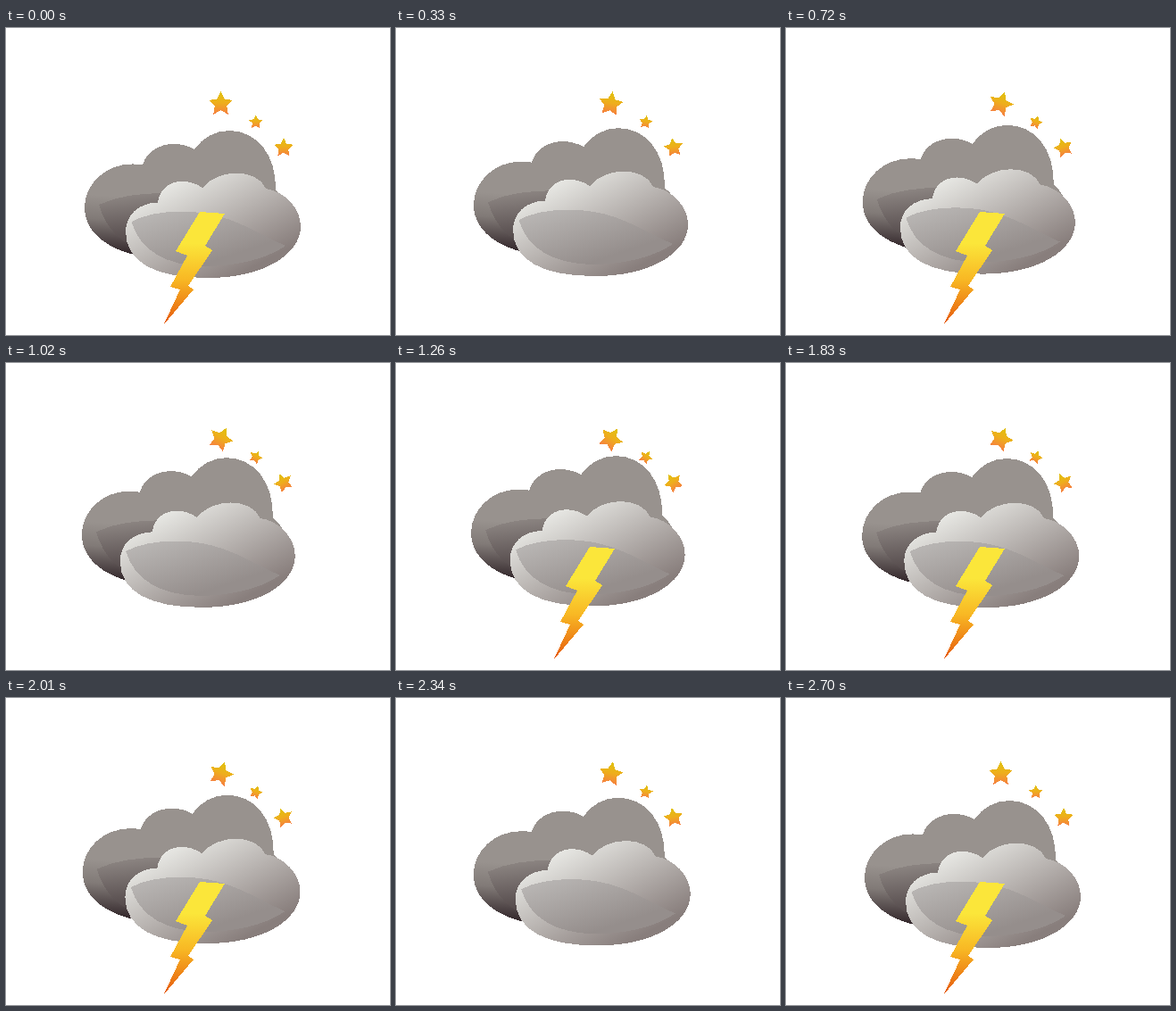
Write an HTML page that moves like this. It is 430 px wide and 344 px high and loops after 2.73 s.

```html
<!DOCTYPE html>
<html lang="en">
<head>
<meta charset="utf-8">
<title>Stormy night</title>
<style>
  html, body { margin: 0; width: 100%; height: 100%; overflow: hidden; background: #fff; }
  svg { display: block; width: 100vw; height: 100vh; }
</style>
</head>
<body>
<svg viewBox="0 0 430 344" shape-rendering="crispEdges">
  <defs>
    <linearGradient id="backFill" gradientUnits="userSpaceOnUse" x1="148" y1="190" x2="144" y2="256">
      <stop offset="0" stop-color="#98928e"/>
      <stop offset=".4" stop-color="#817a77"/>
      <stop offset="1" stop-color="#2e2226"/>
    </linearGradient>
    <linearGradient id="backLens" gradientUnits="userSpaceOnUse" x1="142" y1="186" x2="150" y2="254">
      <stop offset="0" stop-color="#8c8582"/>
      <stop offset="1" stop-color="#43383a"/>
    </linearGradient>
    <linearGradient id="frontFill" gradientUnits="userSpaceOnUse" x1="195" y1="170" x2="255" y2="280">
      <stop offset="0" stop-color="#e6e6e2"/>
      <stop offset="1" stop-color="#887e7c"/>
    </linearGradient>
    <linearGradient id="frontLens" gradientUnits="userSpaceOnUse" x1="190" y1="202" x2="212" y2="268">
      <stop offset="0" stop-color="#b7b4b2"/>
      <stop offset="1" stop-color="#958e8c"/>
    </linearGradient>
    <linearGradient id="boltFill" gradientUnits="userSpaceOnUse" x1="0" y1="206" x2="0" y2="332">
      <stop offset=".28" stop-color="#fbe63a"/>
      <stop offset=".6" stop-color="#f8b824"/>
      <stop offset="1" stop-color="#e65a0c"/>
    </linearGradient>
    <linearGradient id="starFill" x1="0" y1="0" x2="0" y2="1">
      <stop offset=".1" stop-color="#e2bf12"/>
      <stop offset=".5" stop-color="#eeae1c"/>
      <stop offset="1" stop-color="#f67f42"/>
    </linearGradient>
  </defs>

  <g id="stars" fill="url(#starFill)"></g>

  <g id="back">
    <path fill="url(#backFill)" d="M153 153.5C160 130 190 124 211 136C220 123 234 115 250 115C280 115 303 141 302 182C310 188 318 200 318 215C318 240 270 262 190 260C120 258 88 232 88 201C88 172 117 147 153 153.5Z"/>
    <path fill="url(#backLens)" d="M104 198C125 188 150 185 180 185C220 185 255 200 290 222C250 252 200 256 160 250C130 245 112 225 104 198Z"/>
  </g>

  <g id="front">
    <path fill="url(#frontFill)" d="M170 195.5C173 172 199 165 220 179C238 157 281 157 291 180C312 183 330 202 330 222C330 254 288 280 226 280C168 280 134 263 134 228C134 209 149 196 170 195.5Z"/>
    <path fill="url(#frontLens)" d="M140.5 217C160 206 195 203 225 208C260 214 285 232 313 244C290 260 255 267 222 267C180 266 150 250 140.5 217Z"/>
  </g>

  <path id="bolt" fill="url(#boltFill)" d="M217 206L245 208L223 244L231 249L204 289L210 293L176.5 332.5L195 293L184 290L203 255L190 250Z"/>
</svg>
<script>
const LOOP = 2730, STEP = 30, CYCLE = 2700, PEAK = 1390, BLINK = CYCLE / 4;
// time, x, y
const frontKeys = [[0, 0, 0], [675, -6.1, -4.1], [1300, -6.4, -7.8], [1620, -3.1, -7], [2025, -0.5, -4.9], [2700, 0, 0]];
// x, y, radius, turn
const stars = [[240.5, 85.3, 14.2, 36], [279.7, 105.6, 8, 36], [310.8, 134.2, 11.2, -36]];
const $ = id => document.getElementById(id);
const move = (el, x, y) => el.setAttribute('transform', `translate(${x} ${y})`);

function starPoints(r) {
  return Array.from({ length: 10 }, (_, i) => {
    const a = (i / 5 - 0.5) * Math.PI, d = i % 2 ? r * 0.5 : r;
    return (d * Math.cos(a)).toFixed(2) + ',' + (d * Math.sin(a)).toFixed(2);
  }).join(' ');
}

const starEls = stars.map(([, , r]) => {
  const el = document.createElementNS('http://www.w3.org/2000/svg', 'polygon');
  el.setAttribute('points', starPoints(r));
  return $('stars').appendChild(el);
});

function frontAt(t) {
  const i = Math.max(1, frontKeys.findIndex(k => k[0] >= t));
  const a = frontKeys[i - 1], b = frontKeys[i];
  const k = (t - a[0]) / (b[0] - a[0]);
  return [1, 2].map(n => a[n] + (b[n] - a[n]) * k);
}

function draw(ms) {
  const t = Math.floor((ms % LOOP) / STEP) * STEP;
  const swing = t < PEAK ? t / PEAK : (CYCLE - t) / (CYCLE - PEAK);
  move($('back'), -4.3 * swing, -12 * swing);
  move($('front'), ...frontAt(t));

  starEls.forEach((el, n) => {
    const [x, y, , turn] = stars[n];
    el.setAttribute('transform', `translate(${x} ${y}) rotate(${turn * swing})`);
  });

  const phase = t % BLINK;
  $('bolt').setAttribute('visibility', phase >= 170 && phase < 480 ? 'hidden' : 'visible');
}

const start = performance.now();
function tick() {
  draw(performance.now() - start);
  requestAnimationFrame(tick);
}
tick();
</script>
</body>
</html>
```
